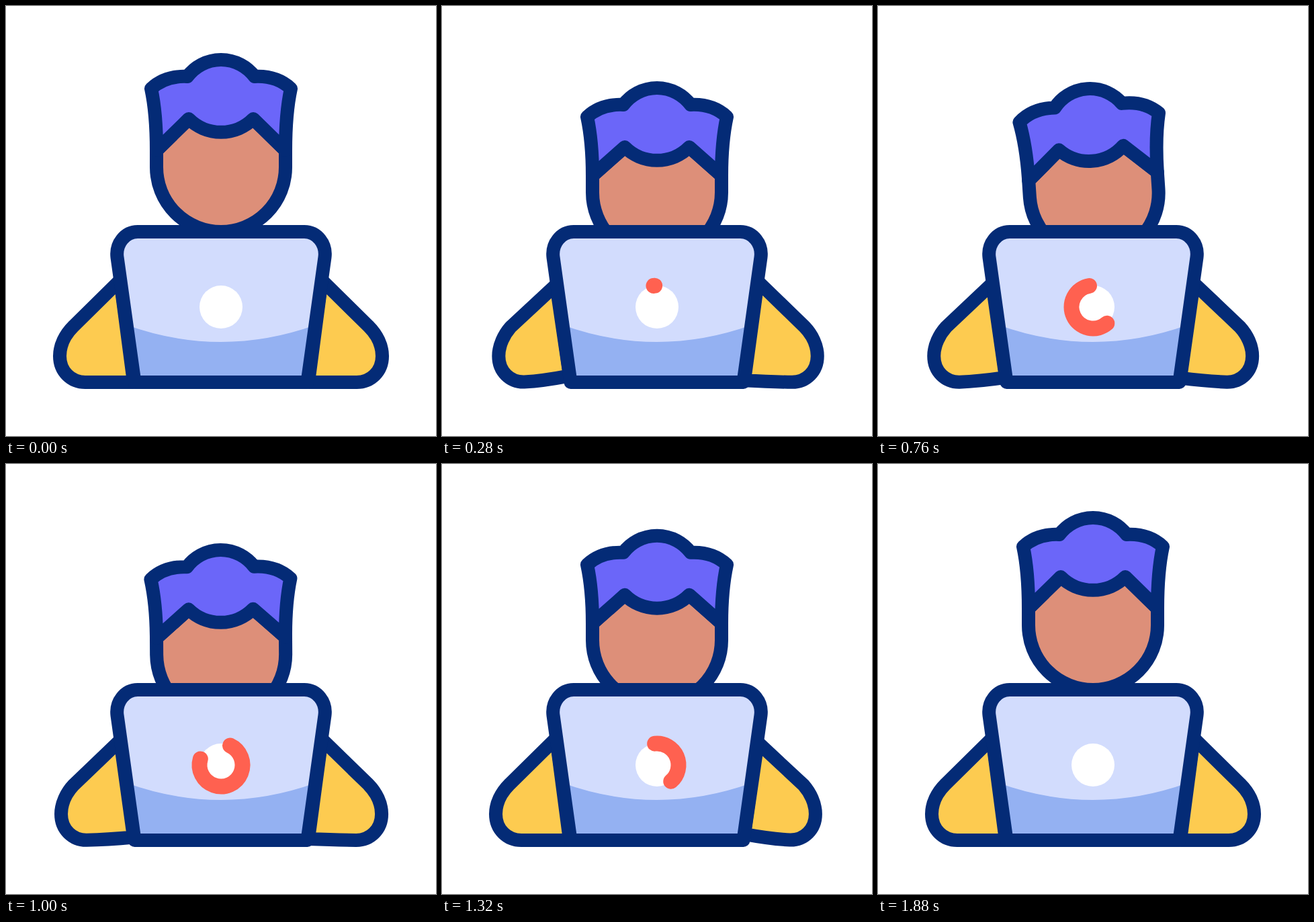
Write an HTML page that moves like this. It is 640x640 px and loops after 2 s.

```html
<!DOCTYPE html>
<html lang="en">
<head>
<meta charset="utf-8">
<title>Working at a laptop</title>
<style>
  html, body { margin: 0; height: 100%; overflow: hidden; background: #fff; }
  svg { display: block; width: 100vw; height: 100vh; }
  .line { stroke: #042b76; stroke-width: 20; stroke-linecap: round; stroke-linejoin: round; }
</style>
</head>
<body>
<svg viewBox="0 0 640 640">
  <g id="head" class="line">
    <path id="face" fill="#dd8f79"/>
    <path id="hair" fill="#6b66f9"/>
  </g>
  <g class="line" fill="#fdcb50">
    <path id="left"/>
    <path id="right" transform="matrix(-1 0 0 1 640 0)"/>
  </g>
  <path id="lid" fill="#d2dcfd" d="M191.500 560L165.500 374C163 354 177 336 196 336H444C463 336 477 354 474.500 374L448.500 560Z"/>
  <path fill="#94b1f2" d="M180 475Q320 525 460 475L448 560H192Z"/>
  <use href="#lid" class="line" style="fill-opacity:0"/>
  <circle cx="320" cy="448" r="32" fill="#fff"/>
  <path id="ring" fill="none" stroke="#ff6150" stroke-width="23" stroke-linecap="round"/>
</svg>
<script>
  const LOOP = 2000;
  const el = id => document.getElementById(id);
  const draw = (id, d) => el(id).setAttribute('d', d);
  const ease = (t, from, to) => {
    const p = Math.min(1, Math.max(0, (t - from) / (to - from)));
    return p * p * (3 - 2 * p);
  };

  // Three typing strokes, each rising and falling once
  const typing = (t, start, period = 430) => {
    const n = (t - start) / period;
    return n < 0 || n > 3 ? 0 : (1 - Math.cos(2 * Math.PI * n)) / 2;
  };

  function arm(id, a) {
    const x = 4.5 * a;
    draw(id, `M170 ${408 + 7 * a}L${100 + 2 * a} ${477 + a}
      C${88 + x} 489 ${80 + x} 505 ${80 + x} 521
      C${80 + x} 544 ${97 + x} 560 ${118 + x} ${560 - a / 2}
      Q150 ${560 - 2 * a} 190 ${560 - 10 * a}Z`);
  }

  function head(t) {
    const y = 42 * ease(t, 40, 280) + 6 * ease(t, 680, 1000) - 48 * ease(t, 1100, 1580);
    const tilt = 3.8 * (ease(t, 760, 1060) - ease(t, 280, 640));
    const lift = 4.5 * Math.min(1, y / 10); // hair sinks a little further than the face
    const top = 123 + lift, notch = 105 + lift, fringe = 168 + lift;
    const side = 160 + lift;
    el('head').setAttribute('transform', `translate(0 ${y - lift}) rotate(${tilt} 320 215)`);
    draw('face', `M224 215V240A96 96 0 0 0 416 240V215L368 ${fringe}H272Z`);
    draw('hair', `M224 215Q224 ${side} 216 ${top}
      C232 ${top - 15} 250 ${top - 19} 270 ${notch}
      A62.500 62.500 0 0 1 370 ${notch}
      C390 ${top - 19} 408 ${top - 15} 424 ${top}
      Q416 ${side} 416 215L368 ${fringe}
      A68 68 0 0 1 272 ${fringe}Z`);
  }

  function ring(t) {
    el('ring').style.display = t >= 240 && t < 1840 ? '' : 'none';
    const lead = 360 * ease(t, 230, 1171);
    const tail = Math.min(360 * ease(t, 692, 1807), lead - 0.5);
    const point = turn => {
      const a = (-96 - turn) * Math.PI / 180;
      return `${320 + 32 * Math.cos(a)} ${448 + 32 * Math.sin(a)}`;
    };
    draw('ring', `M${point(tail)}A32 32 0 ${lead - tail > 180 ? 1 : 0} 0 ${point(lead)}`);
  }

  function frame() {
    const t = performance.now() % LOOP;
    head(t);
    arm('left', typing(t, 40));
    arm('right', typing(t, 205));
    ring(t);
    requestAnimationFrame(frame);
  }
  frame();
</script>
</body>
</html>
```
